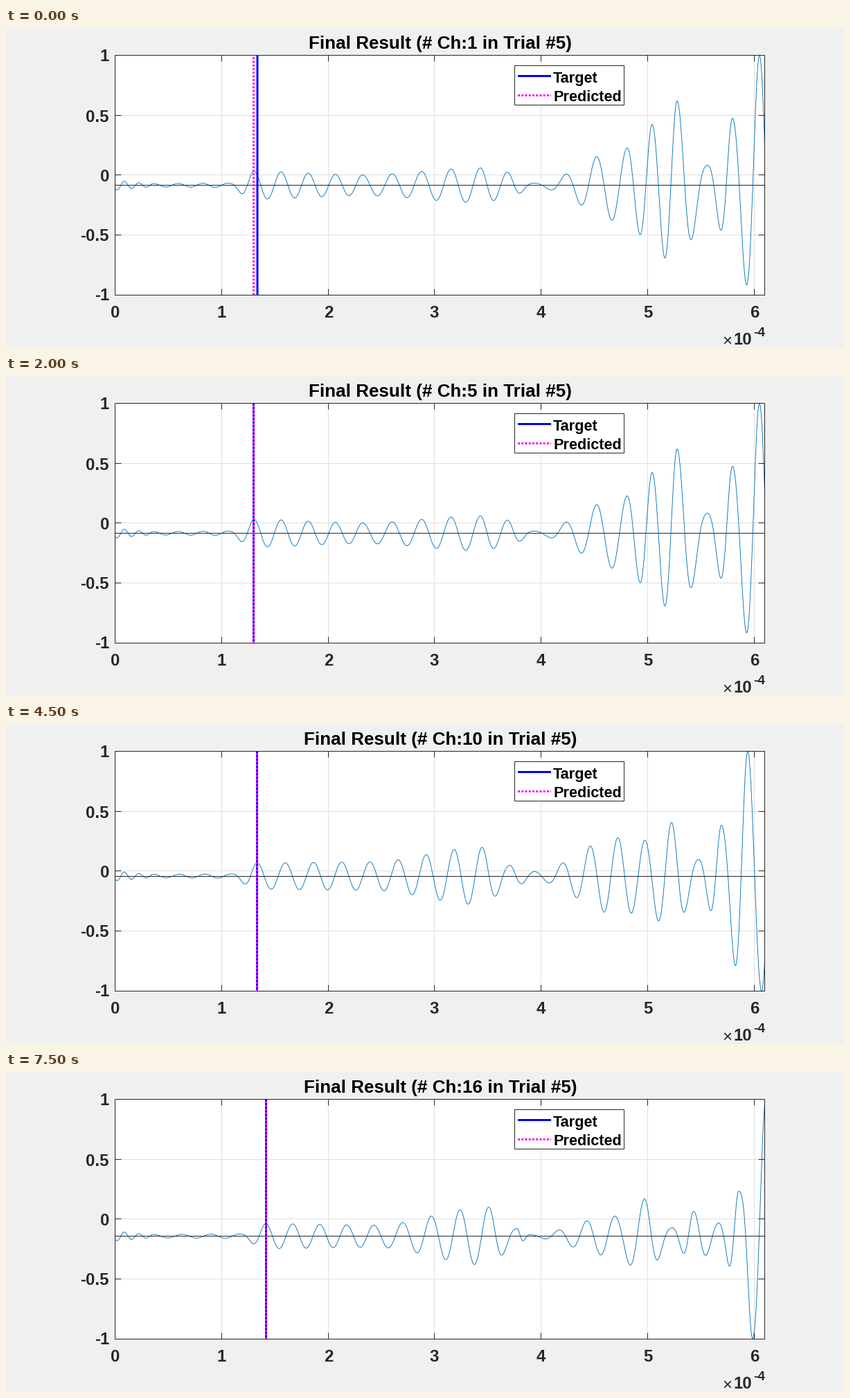
A matplotlib script that plays this animation: 1210 px wide and 463 px high, repeating every 8 s.

```python
import matplotlib.pyplot as plt
import numpy as np
from matplotlib.animation import FuncAnimation
from matplotlib.patches import Rectangle

W, H, DPI = 1210, 463, 100
PX = 72 / DPI
LEFT, RIGHT, TOP, BOTTOM = 157.5, 1095.5, 39.5, 386.5
UNIT_X, UNIT_Y, MID = 153.77, 173.2, 213
INK, GRID, BLUE, MAGENTA = "#262626", "#dfdfdf", "#0000ff", "#ff00ff"
DOTS = (0, (1, 0.75))

# Each wave is an oscillation whose phase and swing are set at a few cycles,
# counted from its first strong peak.
CYCLES = np.array([0, 4, 8, 9, 10, 13, 14, 15, 16, 17, 18, 18.5, 19])
PEAKS_A = np.array([358, 515, 685, 724, 763, 897, 933, 969, 1013, 1049, 1088, 1107, 1127])
SWING_A = np.array([20, 15, 25, 19, 3, 54, 88, 122, 29, 97, 188, 160, 150])
PEAKS_C = np.array([367, 536, 690, 731, 763, 870, 912, 953, 987, 1017, 1054, 1075, 1095])
SWING_C = np.array([18, 26, 58, 12, 10, 57, 16, 33, 19, 50, 173, 173, 115])
PEAKS_D = np.array([375, 531, 697, 738, 757, 879, 922, 962, 993, 1029, 1058, 1078, 1097])
SWING_D = np.array([18, 16, 42, 11, 2, 29, 54, 12, 36, 19, 65, 148, 197])


def ease(x, xp, yp):
    """Interpolate with half cosines, flat at every knot."""
    i = np.clip(np.searchsorted(xp, x, "right") - 1, 0, len(xp) - 2)
    t = np.clip((x - xp[i]) / (xp[i + 1] - xp[i]), 0, 1)
    return yp[i] + (yp[i + 1] - yp[i]) * (1 - np.cos(np.pi * t)) / 2


def wave(level, peaks, swing):
    """Faint ripple first, then the oscillation given by peaks and swing."""
    cycles = np.r_[-7, -4, -1, CYCLES]
    phase = np.interp(xs, np.r_[150, 213, peaks[0] - 38, peaks], cycles)
    size = ease(phase, cycles, np.r_[7, 2.5, 3, swing])
    return level - size * np.cos(2 * np.pi * phase)


xs = np.linspace(LEFT, RIGHT, 1877)

# Per sensor: mean level, curve, predicted x, target offset on each round.
SENSORS = [
    (227.5, wave(227.5, PEAKS_A, SWING_A), 357.5, (5.5, 0, -1, -1)),
    (220, wave(220, (PEAKS_A + PEAKS_C) / 2, (SWING_A + SWING_C) / 2), 362.5, (5, 2, 0, 0)),
    (212.5, wave(213, PEAKS_C, SWING_C), 367.5, (4, 3, 2, 0)),
    (237.5, wave(237.5, PEAKS_D, SWING_D), 375.5, (4, 3, 2, 0)),
]

plt.rcParams["font.family"] = "Liberation Sans"
fig = plt.figure(figsize=(W / DPI, H / DPI), dpi=DPI, facecolor="#f0f0f0")
ax = fig.add_axes([0, 0, 1, 1])
ax.set(xlim=(0, W), ylim=(H, 0))
ax.axis("off")


def line(x, y, color, width, z, **kw):
    kw.setdefault("solid_capstyle", "butt")
    return ax.plot(x, y, color=color, lw=width * PX, zorder=z, snap=False, **kw)[0]


def label(x, y, text, size=24, ha="left", color=INK, weight="bold"):
    return ax.text(x, y, text, fontsize=size * PX, ha=ha, va="baseline",
                   color=color, weight=weight, zorder=9)


def box(x0, y0, x1, y1, z, face, edge):
    ax.add_patch(Rectangle((x0, y0), x1 - x0, y1 - y0, facecolor=face,
                           edgecolor=edge, lw=PX, zorder=z, snap=False))


def crisp(v):
    """Centre of the pixel that holds v."""
    return np.floor(v) + 0.5


box(LEFT, TOP, RIGHT, BOTTOM, 0, "white", "none")
box(LEFT, TOP, RIGHT, BOTTOM, 6, "none", INK)

for k in range(7):
    x = crisp(LEFT + k * UNIT_X)
    if k:
        line([x, x], [TOP, BOTTOM], GRID, 1, 1)
        line([x, x], [TOP, TOP + 9], INK, 1, 6)
        line([x, x], [BOTTOM, BOTTOM - 9], INK, 1, 6)
    label(x, 419, str(k), ha="center")

for v in (1, 0.5, 0, -0.5, -1):
    y = crisp(MID - 0.3 - v * UNIT_Y)
    if abs(v) < 1:
        line([LEFT, RIGHT], [y, y], GRID, 1, 1)
        line([LEFT, LEFT + 9], [y, y], INK, 1, 6)
        line([RIGHT, RIGHT - 9], [y, y], INK, 1, 6)
    label(149, y + 9, f"{v:g}", ha="right")

label(1034, 460, "×", weight="normal")
label(1051, 457.5, "10")
label(1079, 446, "-4", 19)

box(734.5, 54.5, 892.5, 111.5, 7, "white", INK)
line([739, 787], [69.5, 69.5], BLUE, 3, 8)
line([739, 787], [97.5, 97.5], MAGENTA, 3, 8, ls=DOTS, dash_capstyle="butt")
label(790, 78.5, "Target", 21.7, color="black")
label(790, 105.5, "Predicted", 21.7, color="black")

title = label(627, 29.7, "", 26, ha="center", color="black")
signal = line(xs, xs, "#0072bd", 0.9, 3)
mean = line([LEFT, RIGHT], [MID, MID], INK, 1, 4)
target = line([0, 0], [TOP, BOTTOM], BLUE, 3, 5)
predicted = line([0, 0], [BOTTOM, TOP], MAGENTA, 3, 5.5, ls=DOTS, dash_capstyle="butt")


def update(i):
    level, curve, guess, offsets = SENSORS[i % 4]
    goal = guess + offsets[i // 4]
    title.set_text(f"Final Result (# Ch:{i + 1} in Trial #5)")
    signal.set_ydata(curve)
    mean.set_ydata([crisp(level)] * 2)
    target.set_xdata([goal, goal])
    predicted.set_xdata([guess, guess])
    return title, signal, mean, target, predicted


anim = FuncAnimation(fig, update, frames=16, interval=500, repeat=True, repeat_delay=0)
plt.show()
```
